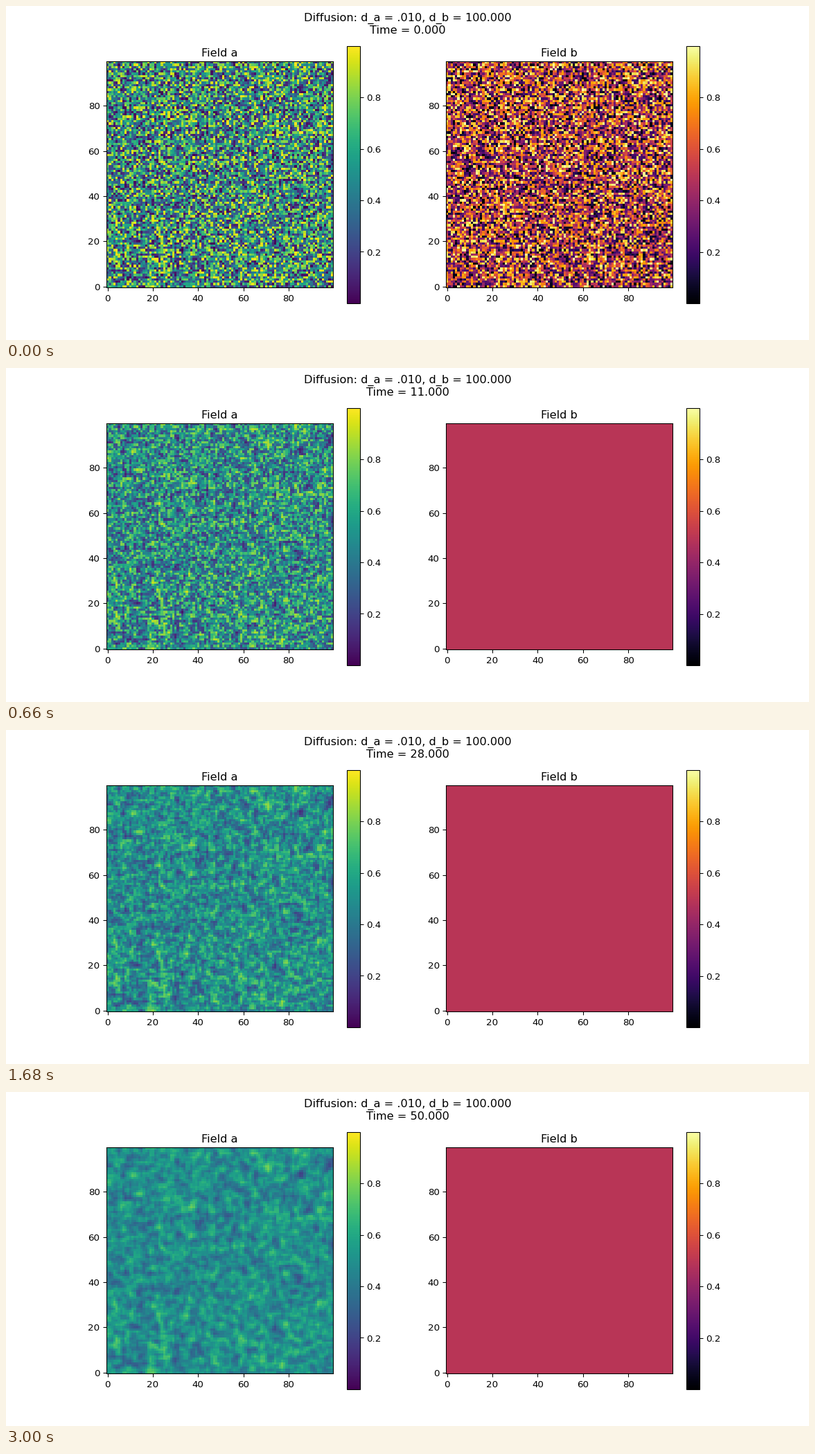
A matplotlib script for the animation above (3.06 s loop, 1159 by 483 pixels).

```python
import numpy as np
import matplotlib.pyplot as plt
from matplotlib.animation import FuncAnimation

SIZE = 100
D_A, D_B = 0.01, 100.0
FRAMES, INTERVAL = 51, 60

np.random.seed(0)

# Eigenvalues of the periodic five-point Laplacian
wave = 2 - 2 * np.cos(2 * np.pi * np.fft.fftfreq(SIZE))
decay = wave[:, None] + wave[None, :]


def diffuse(spectrum, rate, time):
    return np.fft.ifft2(spectrum * np.exp(-rate * time * decay)).real


def add_field(ax, name, cmap):
    """Show a random field; return its image and its Fourier spectrum."""
    noise = np.random.rand(SIZE, SIZE)
    image = ax.imshow(noise, cmap=cmap, origin="lower")
    ax.set_title(name)
    fig.colorbar(image, ax=ax)
    return image, np.fft.fft2(noise)


# The dpi leaves a fraction of a pixel so that the canvas is 1159 x 483
fig, (ax_a, ax_b) = plt.subplots(1, 2, figsize=(12, 5), dpi=96.62)
image_a, spectrum_a = add_field(ax_a, "Field a", "viridis")
image_b, spectrum_b = add_field(ax_b, "Field b", "inferno")
heading = fig.suptitle("")


def update(time):
    image_a.set_data(diffuse(spectrum_a, D_A, time))
    image_b.set_data(diffuse(spectrum_b, D_B, time))
    heading.set_text(f"Diffusion: d_a = .010, d_b = 100.000\nTime = {time:.3f}")
    return image_a, image_b, heading


update(0)
animation = FuncAnimation(fig, update, frames=FRAMES, interval=INTERVAL,
                          repeat=True, repeat_delay=0)
plt.show()
```
